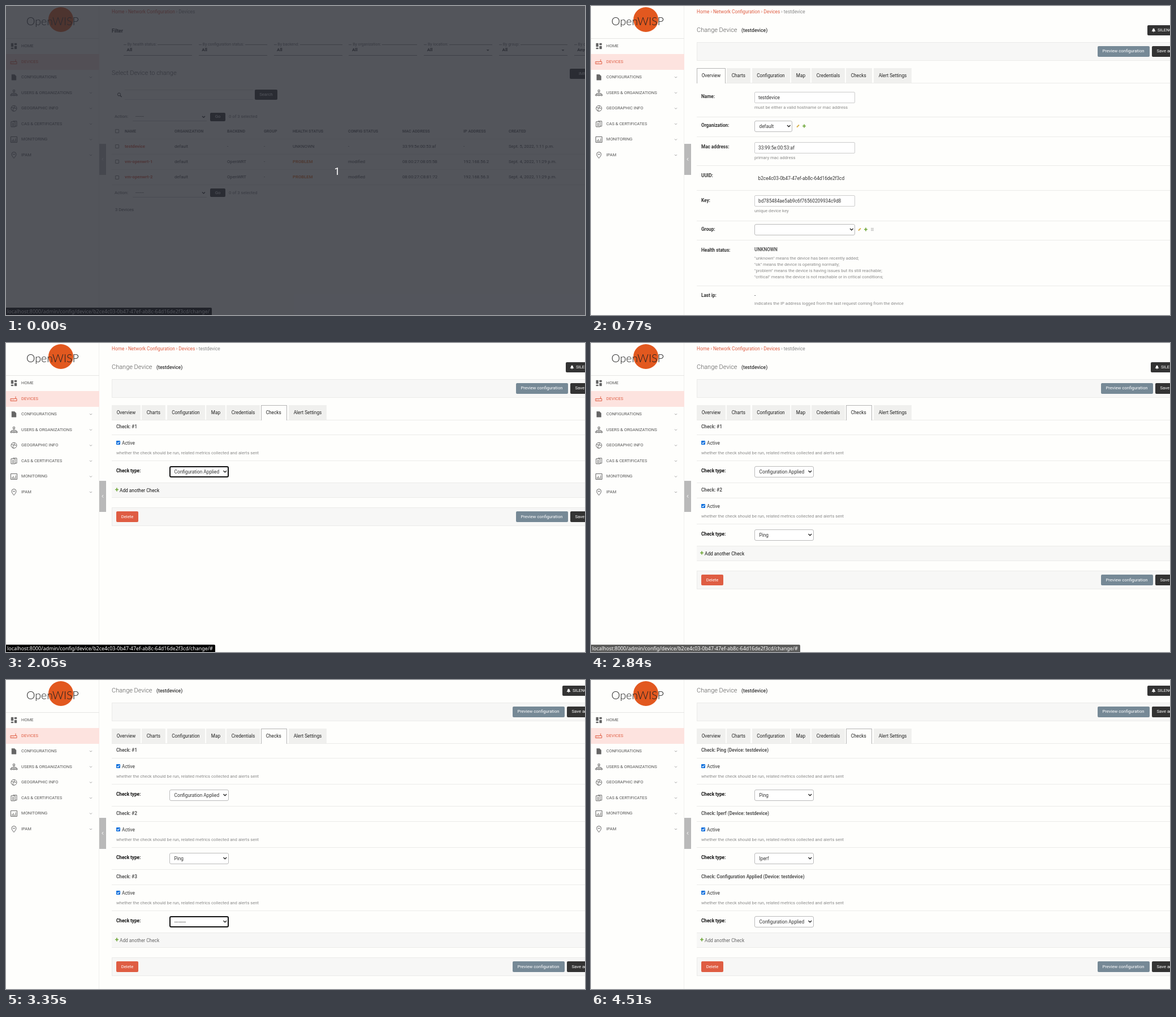
Recreate the animation shown at these times as an HTML page. Size 1024x547 px, loop 4.97 s.

```html
<!DOCTYPE html>
<html lang="en">
<head>
<meta charset="utf-8">
<title>Device checks</title>
<style>
html, body { margin: 0; width: 100%; height: 100%; overflow: hidden; background: #fefefc; }
#stage { position: absolute; left: 0; top: 0; width: 1024px; height: 547px; overflow: hidden; font-family: Roboto, sans-serif; }
#stage div, #stage svg { position: absolute; }
.layer { left: 0; top: 0; width: 1024px; height: 547px; }
.t { white-space: pre; line-height: 12px; }
.c { text-align: center; }
.box { box-sizing: border-box; }
#status { left: 0; top: 534px; height: 13px; padding: 0 4px 0 2px; background: #000; color: #fff; border-radius: 0 2px 0 0;
  font: 8.9px/13px "Noto Sans", sans-serif; white-space: pre; }
#veil { background: #fefefc; }
#dim { background: rgba(40, 43, 52, .8); }
</style>
</head>
<body>
<div id="stage">
  <div id="list" class="layer"></div>
  <div id="form" class="layer"></div>
  <div id="side" class="layer"></div>
  <div id="veil" class="layer"></div>
  <div id="status"></div>
  <div id="dim" class="layer"></div>
</div>
<script>
const LOOP = 4970;
const RED = '#df5d43', DARK = '#333', GREY = '#8a8a8a', LINE = '#ebebe9', BAR = '#f7f7f6', SLATE = '#768996';
const $ = id => document.getElementById(id);

// y is the middle of the text line
const text = (x, y, s, size = 8.3, color = DARK, weight = 400, extra = '') =>
  `<div class="t" style="left:${x}px;top:${y - 6}px;font-size:${size}px;color:${color};font-weight:${weight};${extra}">${s}</div>`;
const box = (x, y, w, h, style) =>
  `<div class="box" style="left:${x}px;top:${y}px;width:${w}px;height:${h}px;${style}"></div>`;
const rule = (y, x = 187, w = 850, color = LINE) => box(x, y, w, 1, `background:${color}`);
const path = (d, color, width = 1, fill = 'none') =>
  `<path d="${d}" fill="${fill}" stroke="${color}" stroke-width="${width}"/>`;
const svg = body => `<svg class="layer" width="1024" height="547">${body}</svg>`;
const button = (x, y, w, h, s, bg, size = 7.72) =>
  box(x, y - h / 2, w, h, `background:${bg};border-radius:2px`) +
  `<div class="t c" style="left:${x}px;top:${y - 6}px;width:${w}px;font-size:${size}px;color:#fff">${s}</div>`;
const input = (x, y, w, s) =>
  box(x, y - 10, w, 20, 'border:1px solid #ccc;border-radius:2px;background:#fff') + text(x + 7, y, s);
const select = (x, y, w, s, ring) =>
  box(x, y - 10, w, 20, `border:${ring ? '2px solid #111' : '1px solid #bbb'};border-radius:3px;background:#fff`) +
  text(x + 8.5, y, s) +
  svg(path(`M${x + w - 9} ${y - 1.5}l2.8 2.8 2.8-2.8`, '#222', 1.3));
const plus = (x, y, color) => svg(path(`M${x - 3} ${y}h6M${x} ${y - 3}v6`, color, 1.7));
const crumbs = last => text(187, 9.5,
  `<span style="color:${RED}">${['Home', 'Network Configuration', 'Devices'].slice(0, last ? 3 : 2).join(' › ')}</span> › ${last || 'Devices'}`,
  8.3, GREY);

function sidebar() {
  const names = ['HOME', 'DEVICES', 'CONFIGURATIONS', 'USERS &amp; ORGANIZATIONS', 'GEOGRAPHIC INFO',
    'CAS &amp; CERTIFICATES', 'MONITORING', 'IPAM'];
  const glyphs = [
    ['M-5-5h4v6h-4zM1-5h4v3h-4zM1 0h4v5h-4zM-5 3h4v2h-4z', 0, 1],
    ['M-6 0h11v4h-11zM3 0v-4M-4 2h1M-1 2h1'],
    ['M-4-5h5l3 3v7h-8z', 0, 1],
    ['M-1.5-5h3v3h-3zM0-2v3M-4 3v-2h8v2M-6 3h3v2h-3zM-1.5 3h3v2h-3zM3 3h3v2h-3z'],
    ['M-5 0a5 5 0 1 0 10 0a5 5 0 1 0-10 0M-4-2l4 2-2 2 1 3M1-4l-1 3 4 1'],
    ['M-5-4h7v9h-7zM-2-5h7v9h-3M-3-1h3M-3 1h3M-3 3h3'],
    ['M-5.5-5h11v10h-11zM-3 4v-3M-1 4v-5M1 4v-2M3 4v-6'],
    ['M0 5.5C-3 2-4 0-4-1.500a4 4 0 1 1 8 0C4 0 3 2 0 5.500M-2-1.500h4']
  ];
  let out = box(0, 0, 165, 547, 'background:#fefefc;border-right:1px solid #efefed') +
    box(0, 57, 165, 1, 'background:#e6e6e4') + box(0, 85, 165, 27.5, 'background:#fde3df') +
    box(75, 2, 44, 44, 'background:#e2581f;border-radius:50%') +
    text(36, 27, 'OpenWISP', 19.5, '#222', 300, 'font-family:Lato,sans-serif;');
  let icons = '';
  names.forEach((name, i) => {
    const y = 71 + 27.57 * i, color = i === 1 ? RED : '#666';
    out += text(27, y, name, 7.6, i === 1 ? RED : '#555');
    const [d, , solid] = glyphs[i];
    icons += `<g transform="translate(14 ${y})">${path(d, color, solid ? .4 : 1, solid ? color : 'none')}</g>`;
    if (i > 1 && i < 8) icons += path(`M148 ${y - 1}l2 2 2-2`, '#999', .9);
  });
  out += box(165, 244, 12, 55, 'background:#b9b9b9');
  return out + svg(icons + path('M172 269l-2 2.300 2 2.300', '#fff', 1));
}

function actionRow(y) {
  return text(192, y, 'Action:', 7.72, '#666') + box(224, y - 8, 131, 16, 'border-bottom:1px solid #ccc') +
    text(229, y, '-------', 7.72) + svg(path(`M347 ${y - 1}l2.500 2.500 2.500-2.500`, '#222', 1.2)) +
    button(361, y, 27, 15, 'Go', DARK) + text(394, y, '0 of 3 selected', 7.72, '#777');
}

function listPage() {
  let out = crumbs() + text(187, 44, 'Filter', 8.5, DARK, 700);
  ['health status', 'configuration status', 'backend', 'organization', 'location', 'group', 'created'].forEach((s, i) => {
    const x = 208 + 132.8 * i;
    out += box(x, 68, 121, 20, 'border:solid #999;border-width:1px 0') +
      text(x + 5, 68, ` By ${s}: `, 7, '#777', 400, 'background:#fefefc;') +
      text(x + 5.5, 78, i === 6 ? 'Any' : 'All', 8, DARK, 700);
    if (i > 3) out += svg(path(`M${x + 111} 77.500h4l-2 2z`, '#444', .5, '#444'));
  });
  out += text(187, 119, 'Select Device to change', 11, '#555', 300) + button(997, 120, 60, 18, 'IMPORT', DARK) +
    svg('<circle cx="200" cy="156.500" r="2.600" fill="none" stroke="#333"/>' + path('M202 158.500l2.500 2.500', '#333', 1.3)) +
    box(210, 148, 227, 18, 'border:solid #ddd;border-width:1px 0') + button(440, 157, 40, 18, 'Search', DARK) +
    actionRow(196) + actionRow(330.500) + text(193, 361, '3 Devices', 7.72, '#555');
  const cols = [210, 298, 391, 456, 507, 605, 701, 809, 889];
  const rows = [
    'NAME|ORGANIZATION|BACKEND|GROUP|HEALTH STATUS|CONFIG STATUS|MAC ADDRESS|IP ADDRESS|CREATED',
    'testdevice|default|-|-|UNKNOWN|-|33:99:5e:00:53:af|-|Sept. 5, 2022, 1:11 p.m.',
    'vm-openwrt-1|default|OpenWRT|-|PROBLEM|modified|08:00:27:08:05:5B|192.168.56.2|Sept. 4, 2022, 11:29 p.m.',
    'vm-openwrt-2|default|OpenWRT|-|PROBLEM|modified|08:00:27:C8:81:72|192.168.56.3|Sept. 4, 2022, 11:29 p.m.'
  ];
  rows.forEach((row, r) => {
    const y = 221.500 + 27.200 * r;
    out += box(193, y - 3.5, 7, 7, 'border:1px solid #888;border-radius:1px') + rule(y + 13);
    row.split('|').forEach((s, i) => {
      const color = r && i === 0 ? RED : s === 'PROBLEM' ? '#e8762d' : r ? '#444' : '#666';
      out += text(cols[i], y, s, r ? 7.72 : 7.1, color, !r || i === 0 || s === 'PROBLEM' ? 700 : 400);
    });
  });
  return out;
}

function overview() {
  const label = (y, s) => text(195, y, s, 8.2, DARK, 700);
  const help = (y, s) => text(289, y, s, 7.72, GREY);
  const tools = (x, y, n) => svg(path(`M${x - 2} ${y + 2}l4-4`, '#d8b04a', 1.8)) + plus(x + 11, y, '#70a83b') +
    (n > 2 ? svg(path(`M${x + 20} ${y - 2}h5M${x + 20} ${y}h5M${x + 20} ${y + 2}h5`, '#aaa', .8)) : '');
  const notes = ['"unknown" means the device has been recently added;', '"ok" means the device is operating normally;',
    '"problem" means the device is having issues but its still reachable;',
    '"critical" means the device is not reachable or in critical conditions;'];
  return label(160, 'Name:') + input(289, 162, 178, 'testdevice') +
    help(180, 'must be either a valid hostname or mac address') +
    label(211, 'Organization:') + select(289, 212.500, 67, 'default') + tools(366, 212.500, 2) +
    label(249, 'Mac address:') + input(289, 251, 178, '33:99:5e:00:53:af') + help(269, 'primary mac address') +
    label(300, 'UUID:') + text(295.500, 305, 'b2ce4c03-0b47-47ef-ab8c-64d16de2f3cd') +
    label(344, 'Key:') + input(289, 345, 178, 'bd785484ae5ab9c6f76560209934c9d8') + help(363, 'unique device key') +
    label(394.500, 'Group:') + select(289, 395.500, 178, '') + tools(475, 395.500, 3) +
    label(432, 'Health status:') + text(289, 431, 'UNKNOWN', 8.2, '#555', 700) +
    notes.map((s, i) => help(447 + 11 * i, s)).join('') +
    label(512, 'Last ip:') + text(289, 512, '-') +
    help(527, 'indicates the IP address logged from the last request coming from the device') +
    [196, 231, 282, 326, 380, 414, 495].map(y => rule(y)).join('');
}

function checks(s) {
  let out = '';
  s.checks.forEach(([title, value], i) => {
    const y = 112 * i;
    out += text(195, 148 + y, 'Check: ' + title, 8.2, '#555', 700) + rule(162 + y) +
      box(195, 173 + y, 7, 7, 'background:#0b6fdc;border-radius:1px') +
      svg(path(`M196.500 ${176.500 + y}l1.500 1.600 2.700-3.200`, '#fff', 1.1)) +
      text(205, 177 + y, 'Active') +
      text(195, 194.500 + y, 'whether the check should be run, related metrics collected and alerts sent', 7.72, GREY) +
      rule(208 + y) + text(195, 226 + y, 'Check type:', 8.2, '#111', 700) +
      select(289, 227.500 + y, 104.500, value, s.ring === i + 1) + rule(247 + y);
  });
  const n = s.checks.length, add = n ? 148.500 + 112 * n : 157, end = add + 47;
  out += box(187, add - 13.500, 850, 27, `background:${BAR};border:solid ${LINE};border-width:1px 0`) +
    plus(196, add - 1, '#70a83b') + text(201, add, 'Add another Check', 8.3, s.hover ? '#111' : '#666') +
    box(187, end - 16.500, 850, 33, `background:${BAR};border:1px solid ${LINE}`) +
    button(195, end, 39, 19, 'Delete', RED) + submit(s, end);
  if (s.popup) {
    const top = 237 + 112 * (s.popup - 1);
    out += box(289, top, 108, 53, 'background:#fff;border:1px solid #aaa');
    ['---------', 'Configuration Applied', 'Iperf', 'Ping'].forEach((name, i) => {
      const on = i === s.pick;
      if (on) out += box(290, top + .5 + 13 * i, 106, 13, 'background:#1e78d7');
      out += text(297.500, top + 7 + 13 * i, name, 8.3, on ? '#fff' : DARK);
    });
  }
  return out;
}

const shift = s => s.tall ? -6 : 0;
const submit = (s, y) => button(901.500 + shift(s), y, 92, 19, 'Preview configuration', SLATE) +
  button(998 + shift(s), y, 100, 19, '', DARK) + text(1006.500 + shift(s), y, 'Save and continue editing', 7.72, '#fff');

function formPage(s) {
  const bx = 990 + shift(s);
  let out = crumbs('testdevice') + text(187, 42.500, 'Change Device', 11, '#555', 300) +
    text(266, 42.500, '(testdevice)', 8.700, DARK, 500) +
    box(bx, 33.500, 120, 18, `background:${DARK};border-radius:2px`) +
    svg(path(`M${bx + 8} 44.500q1.500-1 1.500-3a1.500 1.500 0 0 1 3 0q0 2 1.500 3zM${bx + 10} 45.700h2`, '#fff', .7, '#fff')) +
    text(bx + 18, 42.800, 'SILENCE NOTIFICATIONS', 7.72, '#fff') +
    box(187, 63.500, 850, 33, `background:${BAR};border:1px solid ${LINE}`) + submit(s, 80) + rule(135.500);
  const tabs = { Overview: [187, 51], Charts: [240, 42], Configuration: [284.500, 67], Map: [354, 34],
    Credentials: [390, 59], Checks: [451, 46], 'Alert Settings': [500, 67] };
  for (const [name, [x, w]] of Object.entries(tabs)) {
    const on = name === s.tab;
    out += box(x, on ? 109.500 : 110, w, on ? 27 : 25.500,
      on ? 'background:#fefefc;border:1px solid #b5b5b5;border-bottom:0' : 'background:#f0f0ee') +
      text(x + 8.700, 123, name, 8.25, '#222');
  }
  return out + (s.tab === 'Checks' ? checks(s) : overview());
}

// each step overrides what came before it
const conf = 'Configuration Applied', none = '---------';
const one = ['#1', conf], two = ['#2', 'Ping'];
const steps = [
  [0, { page: 'list', tab: 'Overview', tall: true, checks: [], ring: 0, popup: 0, pick: 0, hover: false }],
  [400, { page: 'form' }],
  [1080, { tab: 'Checks', tall: false }],
  [1180, { hover: true }],
  [1330, { checks: [['#1', none]] }],
  [1400, { hover: false }],
  [1440, { popup: 1 }],
  [1560, { pick: 1 }],
  [1730, { popup: 0, checks: [one], ring: 1 }],
  [1930, { hover: true }],
  [2060, { checks: [one, ['#2', none]], ring: 0 }],
  [2260, { hover: false }],
  [2360, { popup: 2, pick: 0 }],
  [2480, { pick: 3 }],
  [2640, { popup: 0, checks: [one, two], ring: 2 }],
  [2800, { hover: true, ring: 0 }],
  [2960, { checks: [one, two, ['#3', none]], tall: true }],
  [3340, { hover: false, ring: 3 }],
  [3380, { popup: 3, pick: 0 }],
  [3470, { pick: 2 }],
  [3650, { popup: 0, checks: [one, two, ['#3', 'Iperf']] }],
  [4340, { ring: 0, checks: [['Ping', 'Ping'], ['Iperf', 'Iperf'], [conf, conf]]
    .map(([a, b]) => [`${a} (Device: testdevice)`, b]) }]
];

// linear value through [time, value] points
function track(points, t) {
  let [t0, v0] = points[0];
  for (const [t1, v1] of points) {
    if (t < t1) return t1 > t0 ? v0 + (v1 - v0) * Math.max(0, t - t0) / (t1 - t0) : v0;
    [t0, v0] = [t1, v1];
  }
  return v0;
}
const scroll = [[2990, 0], [3075, 24]];
const veil = [[400, 0], [400, 1], [420, 1], [640, 0], [4340, 0], [4340, 1], [4360, 1], [4510, 0]];
const status = [[0, 1], [440, 1], [570, 0], [1170, 0], [1230, 1], [1335, 1], [1380, 0],
  [1900, 0], [1980, 1], [2070, 1], [2150, 0], [2800, 0], [2865, 1], [2970, 1], [3030, 0]];
const url = 'localhost:8000/admin/config/device/b2ce4c03-0b47-47ef-ab8c-64d16de2f3cd/change/';

$('list').innerHTML = listPage();
$('side').innerHTML = sidebar();
$('dim').innerHTML = text(580.500, 293, '1', 18, '#fff');

let shown = -1;
function draw(t) {
  const k = steps.findLastIndex(step => step[0] <= t);
  if (k !== shown) {
    shown = k;
    const s = Object.assign({}, ...steps.slice(0, k + 1).map(step => step[1]));
    $('list').style.display = s.page === 'list' ? '' : 'none';
    $('form').style.display = s.page === 'form' ? '' : 'none';
    $('form').innerHTML = formPage(s);
  }
  $('form').style.transform = `translateY(${-Math.round(track(scroll, t))}px)`;
  $('form').style.height = '600px';
  $('veil').style.opacity = track(veil, t);
  $('status').style.opacity = track(status, t);
  $('status').textContent = t < 800 ? url : url + '#';
  $('dim').style.display = t < 20 ? '' : 'none';
}
const start = performance.now();
function tick() {
  draw((performance.now() - start) % LOOP);
  requestAnimationFrame(tick);
}
tick();
</script>
</body>
</html>
```
